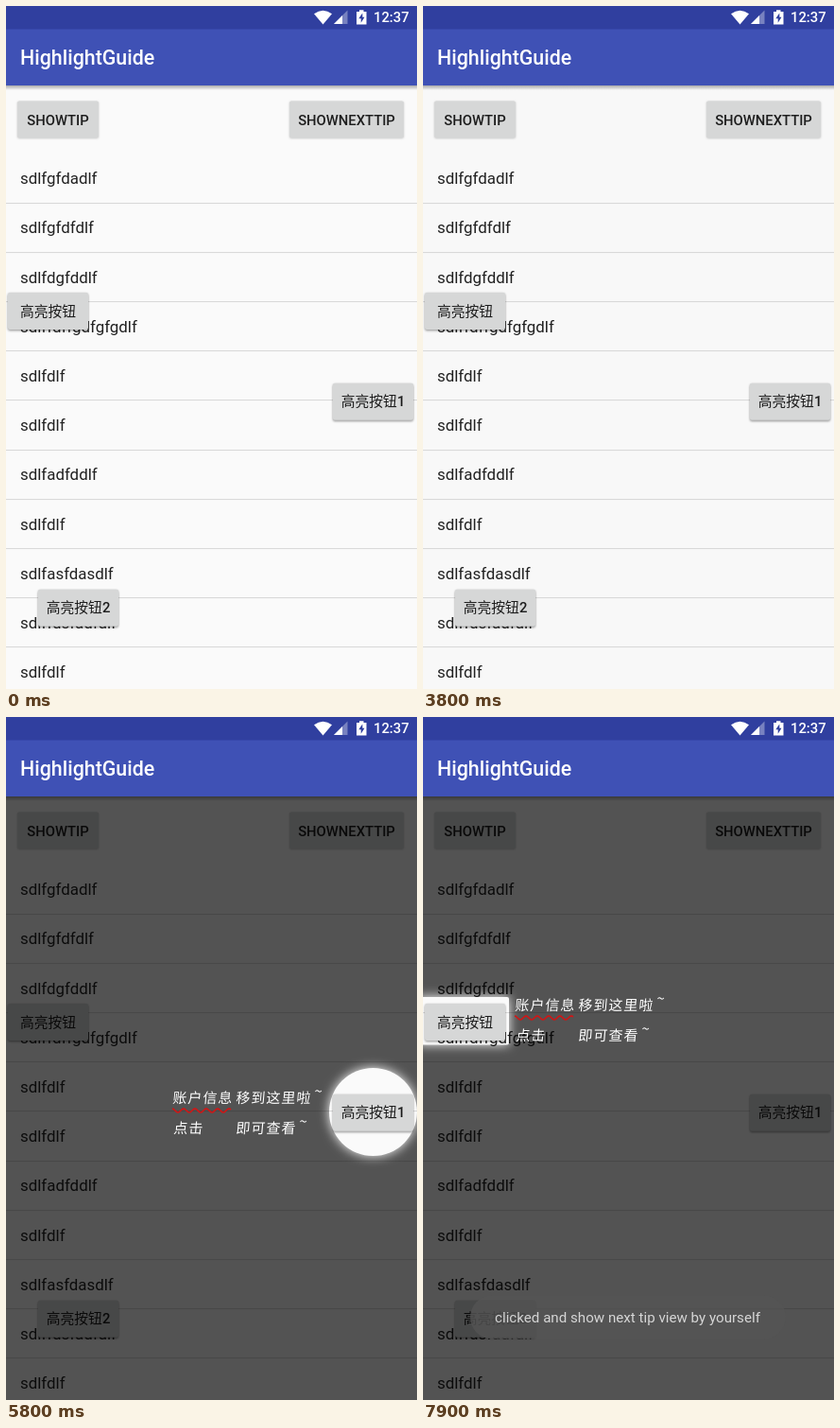
Animation of 435 by 722 pixels, one loop 8000 ms. Source, as an HTML page:

```html
<!DOCTYPE html>
<html lang="zh">
<head>
<meta charset="utf-8">
<title>HighlightGuide</title>
<style>
  html, body { margin: 0; width: 100%; height: 100%; overflow: hidden; background: #fafafa; }
  svg { display: block; width: 435px; height: 722px; }
  text { font-family: Roboto, "Noto Sans CJK SC", "Noto Sans CJK JP", "Noto Sans CJK", sans-serif; white-space: pre; }
  .row { font-size: 16.9px; fill: #212121; }
  .label { font-size: 14.8px; fill: #1d1d1d; text-anchor: middle; }
  .medium { font-weight: 500; }
  .tip { font-family: "Noto Sans CJK SC", "Noto Sans CJK JP", "Noto Sans CJK", sans-serif;
         font-size: 15px; font-weight: 300; letter-spacing: 1px; fill: #fff; }
</style>
</head>
<body>
<svg id="stage" viewBox="0 0 435 722">
  <defs>
    <filter id="glow" x="-40%" y="-60%" width="180%" height="220%"><feGaussianBlur id="blur" stdDeviation="6"/></filter>
    <filter id="soft" x="-20%" y="-30%" width="140%" height="160%"><feGaussianBlur stdDeviation="1"/></filter>
    <linearGradient id="edge" x2="0" y2="1">
      <stop offset="0" stop-opacity=".32"/><stop offset="1" stop-opacity="0"/>
    </linearGradient>
    <mask id="holes" maskUnits="userSpaceOnUse" x="0" y="0" width="435" height="722">
      <rect width="435" height="722" fill="#fff"/>
      <g id="boxHole">
        <rect x="-6" y="296" width="97" height="50.5" rx="2" filter="url(#glow)"/>
        <rect x="-6" y="296" width="97" height="50.5" rx="2"/>
      </g>
      <g id="roundHole">
        <circle cx="388.5" cy="417.5" r="46.5" filter="url(#glow)"/>
        <circle cx="388.5" cy="417.5" r="46.5"/>
      </g>
    </mask>
  </defs>

  <rect id="page" width="435" height="722"/>
  <g id="list"></g>
  <g id="buttons"></g>
  <rect id="ripple" x="317" y="102" width="82" height="37" rx="8"/>
  <rect y="84" width="435" height="5" fill="url(#edge)"/>
  <rect id="dim" y="84" width="435" height="638" fill-opacity=".667" mask="url(#holes)"/>
  <g id="tips"></g>

  <g id="toast">
    <rect x="50" y="611.5" width="334" height="46" rx="23" fill="#555" fill-opacity=".95"/>
    <text x="216.5" y="640" font-size="15.15" text-anchor="middle" fill="#f0f0f0">clicked and show next tip view by yourself</text>
  </g>

  <rect width="435" height="84" fill="#3f51b5"/>
  <rect width="435" height="24.5" fill="#303f9f"/>
  <text x="15" y="62" class="medium" font-size="21.4" fill="#fff">HighlightGuide</text>
  <g fill="#fff">
    <path d="M326 8.3Q335.5 1 345 8.3L335.5 19.5Z"/>
    <path d="M361.5 4.5V19H347Z" opacity=".35"/>
    <path d="M356 10V19H347Z"/>
    <path d="M371 6H374V4.3H378.5V6H381.5V19.5H371Z"/>
    <path d="M377.3 7.5L373.3 13.3H375.7V17.7L379.5 11.7H377.3Z" fill="#303f9f"/>
    <text x="389" y="17" class="medium" font-size="14.8">12:37</text>
  </g>
</svg>
<script>
const LOOP = 8000;
const $ = id => document.getElementById(id);

function add(parent, tag, attrs, content = '') {
  const el = document.createElementNS('http://www.w3.org/2000/svg', tag);
  for (const key in attrs) el.setAttribute(key, attrs[key]);
  el.textContent = content;
  parent.append(el);
  return el;
}

function buildList() {
  const rows = ['sdlfgfdadlf', 'sdlfgfdfdlf', 'sdlfdgfddlf', 'sdlffdffgdfgfgdlf', 'sdlfdlf', 'sdlfdlf',
    'sdlfadfddlf', 'sdlfdlf', 'sdlfasfdasdlf', 'sdlffdsfadfdlf', 'sdlfdlf'];
  rows.forEach((label, i) => {
    const y = i * 52.2;
    add($('list'), 'text', { x: 15, y: Math.round(188.2 + y), class: 'row' }, label);
    add($('list'), 'rect', { y: Math.round(207.5 + y), width: 435, height: 1.1, fill: '#d9d9d9' });
  });
}

// Returns the extra shadow that appears while the button is pressed.
function addButton(x, y, width, label, digit = '') {
  const box = { x, y, width, height: 39, rx: 2 };
  const g = add($('buttons'), 'g', {});
  const pressed = add(g, 'rect', { ...box, y: y + 1.5, 'fill-opacity': .25, filter: 'url(#soft)' });
  add(g, 'rect', { ...box, y: y + .6, 'fill-opacity': .2, filter: 'url(#soft)' });
  add(g, 'rect', { ...box, fill: '#d6d7d7' });
  const latin = /^[A-Z]/.test(label);
  const text = add(g, 'text', {
    x: x + width / 2, y: Math.round(y + (latin ? 25.6 : 24.5)), class: latin ? 'label medium' : 'label'
  }, label);
  if (digit) add(text, 'tspan', { class: 'medium' }, digit);
  return pressed;
}

function addTip(x, y) {
  const g = add($('tips'), 'g', { transform: `translate(${x} ${y})` });
  const write = (dx, dy, s) =>
    add(g, 'text', { transform: `translate(${dx} ${dy}) skewX(-5)`, class: 'tip' }, s);
  write(0, 14, '账户信息');
  write(67, 14, '移到这里啦');
  write(150, 7, '~');
  write(1, 46, '点击');
  write(67, 46, '即可查看');
  write(134, 39, '~');
  let wave = 'M0 20';
  for (let i = 1; i <= 62; i++) wave += `L${i} ${(22 - 2 * Math.cos(i * Math.PI / 6)).toFixed(2)}`;
  add(g, 'path', { d: wave, fill: 'none', stroke: '#d41414', 'stroke-width': 1.6 });
  return g;
}

buildList();
const showPressed = addButton(12, 100.5, 86, 'SHOWTIP');
const nextPressed = addButton(300, 100.5, 121, 'SHOWNEXTTIP');
addButton(2, 303, 85, '高亮按钮');
addButton(346, 398.8, 85, '高亮按钮', '1');
addButton(34, 616.8, 85, '高亮按钮', '2');
const boxTip = addTip(97, 296);
const roundTip = addTip(176, 394);

const show = (el, on) => el.setAttribute('display', on ? 'inline' : 'none');

function render(t) {
  const within = (from, to) => t >= from && t < to;
  const step = from => Math.floor((t - from) / 100);
  const both = within(800, 3800);
  const round = both || within(5600, 7600);
  const box = both || t >= 7600;

  $('page').setAttribute('fill', within(3800, 5600) ? '#f8f8f8' : '#fafafa');
  show(showPressed, within(500, 800));
  show(nextPressed, within(5400, 5600));
  show($('dim'), round || box);
  $('blur').setAttribute('stdDeviation', both ? 8 : 6);
  for (const el of [$('boxHole'), boxTip]) show(el, box);
  for (const el of [$('roundHole'), roundTip]) show(el, round);

  $('ripple').setAttribute('opacity', within(5600, 5800) ? .12 - .06 * step(5600) : 0);
  $('toast').setAttribute('opacity', t < 7600 ? 0 : Math.min(.85, .28 * step(7600)));
}

const start = performance.now();
function tick() {
  render((performance.now() - start) % LOOP);
  requestAnimationFrame(tick);
}
tick();
</script>
</body>
</html>
```
